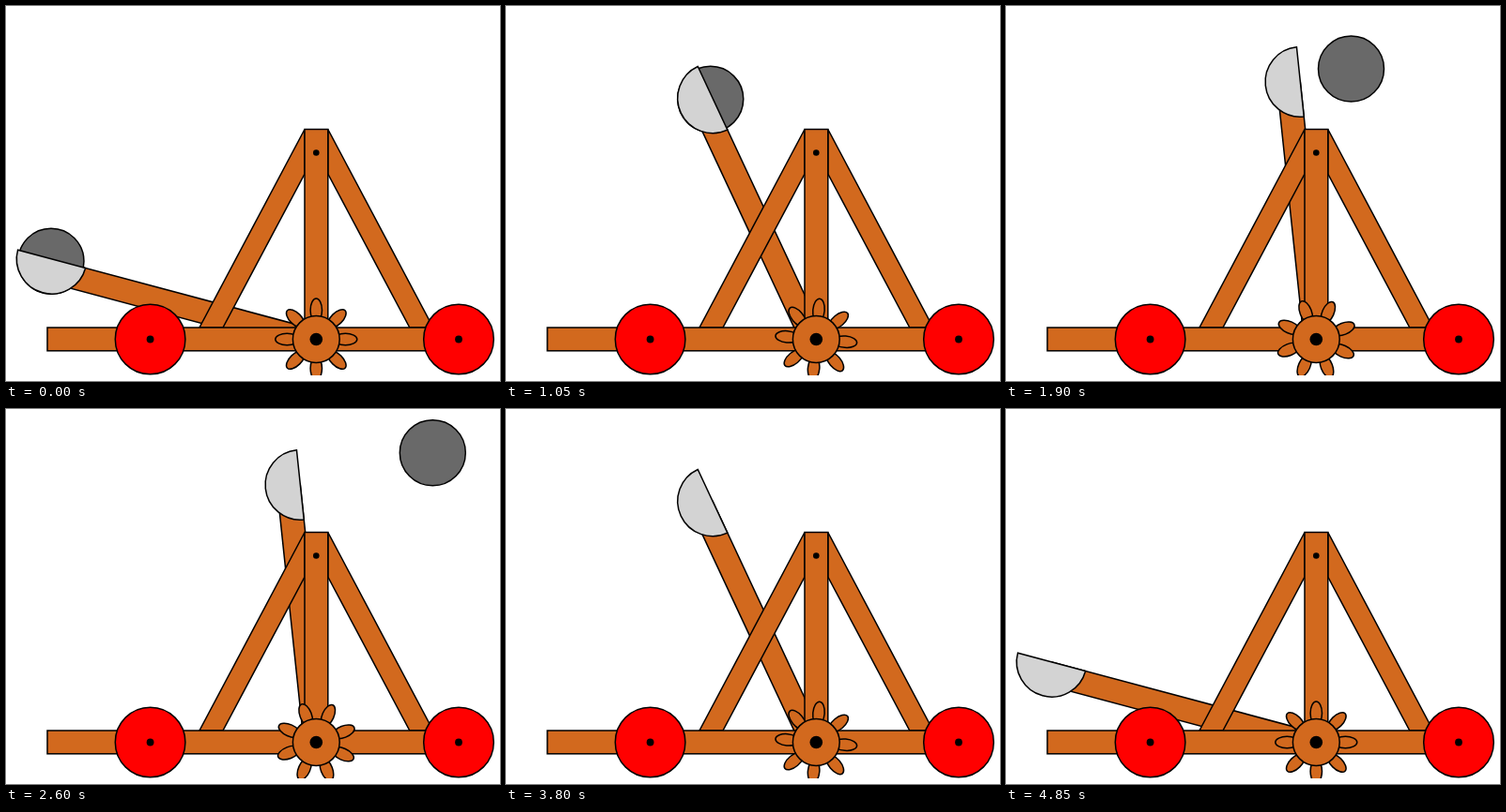
Recreate the animation shown at these times as an HTML page. Size 526x400 px, loop 4900 ms.

```html
<!DOCTYPE html>
<html lang="en">
<head>
<meta charset="utf-8">
<title>Catapult</title>
<style>
  html, body { margin: 0; width: 100%; height: 100%; overflow: hidden; background: #fff; }
  svg { display: block; width: 526px; height: 400px; }
  .shape { stroke: #000; stroke-width: 1.5; }
  .wood { fill: #d2691e; }
  .wheel { fill: #f00; }
</style>
</head>
<body>
<svg viewBox="0 0 526 400">
  <clipPath id="view"><rect x="5" y="5" width="516" height="389"/></clipPath>
  <g clip-path="url(#view)">
    <g class="shape">
      <g id="arm">
        <rect class="wood" x="-286" y="-25" width="286" height="25"/>
      </g>
      <circle id="ball" r="35" fill="#696969"/>
      <path id="bowl" d="M-323.3 -25A37.3 37.3 0 0 0 -248.7 -25Z" fill="#d3d3d3"/>
      <g class="wood">
        <path d="M318 131.5L206 343H231L318 179Z"/>
        <path d="M342.8 131.5L454.8 343H429.8L342.8 179Z"/>
        <rect x="318" y="131.5" width="24.8" height="211.5"/>
        <rect x="44" y="343" width="438" height="24.8"/>
      </g>
      <g class="wheel">
        <circle cx="153.6" cy="355.5" r="37.3"/>
        <circle cx="482" cy="355.5" r="37.3"/>
      </g>
      <g id="gear" class="wood"></g>
      <circle class="wood" cx="330.3" cy="355.5" r="24.9"/>
    </g>
    <circle cx="153.6" cy="355.5" r="3.9"/>
    <circle cx="482" cy="355.5" r="3.9"/>
    <circle cx="330.3" cy="156.5" r="3.3"/>
    <circle cx="330.3" cy="355.5" r="6.8"/>
  </g>
</svg>
<script>
  const STEP = 50, STEPS = 98;
  const LAUNCH = 29, RESET = 68;   // in steps
  const REST = 15, SWING = 69;     // in degrees
  const PIVOT = { x: 318.4, y: 368 };
  const HELD = { x: -286, y: -22.5 };  // ball, relative to the arm

  const [arm, ball, bowl, gear] =
    ['arm', 'ball', 'bowl', 'gear'].map(id => document.getElementById(id));

  for (let i = 0; i < 8; i++) {
    const petal = document.createElementNS(gear.namespaceURI, 'ellipse');
    petal.setAttribute('cx', 31.1);
    petal.setAttribute('rx', 12.4);
    petal.setAttribute('ry', 6.2);
    petal.setAttribute('transform', `rotate(${i * 45})`);
    gear.append(petal);
  }

  function swingAt(step) {
    const up = Math.min(step / LAUNCH, 1);
    const down = Math.max(step - RESET, 0) / LAUNCH;
    return SWING * (up - down);
  }

  function ballAt(step, angle) {
    if (step > LAUNCH) {
      const t = step - LAUNCH;
      return { x: 311.7 + 6.2 * t, y: 82.3 - 1.79 * t + 0.0106 * t * t };
    }
    const a = angle * Math.PI / 180, c = Math.cos(a), s = Math.sin(a);
    return {
      x: PIVOT.x + HELD.x * c - HELD.y * s,
      y: PIVOT.y + HELD.x * s + HELD.y * c
    };
  }

  function draw(ms) {
    const step = Math.floor(ms / STEP) % STEPS;
    const swing = swingAt(step);
    const angle = REST + swing;
    const pose = `translate(${PIVOT.x} ${PIVOT.y}) rotate(${angle})`;
    arm.setAttribute('transform', pose);
    bowl.setAttribute('transform', pose);
    gear.setAttribute('transform', `translate(330.3 355.5) rotate(${swing})`);

    const { x, y } = ballAt(step, angle);
    ball.setAttribute('cx', x);
    ball.setAttribute('cy', y);
    ball.setAttribute('visibility', step < RESET ? 'visible' : 'hidden');
  }

  const start = performance.now();
  function tick() {
    draw(performance.now() - start);
    requestAnimationFrame(tick);
  }
  tick();
</script>
</body>
</html>
```
